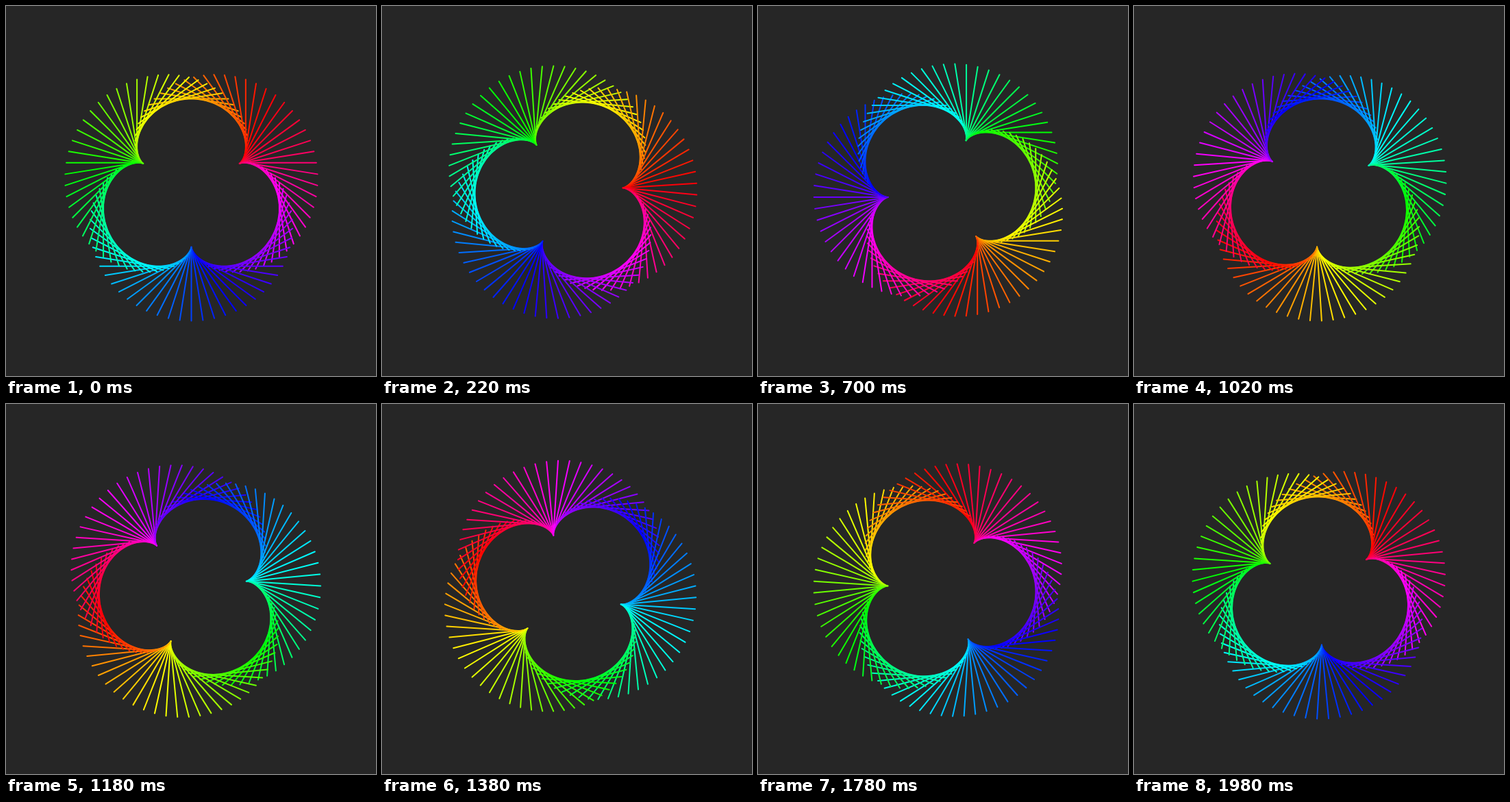
An HTML page with a canvas for the animation above (2000 ms loop, 540 by 540 pixels).

```html
<!DOCTYPE html>
<html lang="en">
<head>
<meta charset="utf-8">
<title>Spinning lines</title>
<style>
html, body { margin: 0; width: 100%; height: 100%; overflow: hidden; background: #262626; }
canvas { display: block; }
</style>
</head>
<body>
<canvas id="stage" width="540" height="540"></canvas>
<script>
const ctx = document.getElementById('stage').getContext('2d');
const COUNT = 100, RADIUS = 135, HALF = 54, CENTER = 270.5;
const LOOP = 2000, STEP = 20;
const TAU = Math.PI * 2;

// Bearings run clockwise from straight up.
function drawLine(turn, phase) {
  const place = turn * TAU;
  const x = CENTER + RADIUS * Math.sin(place);
  const y = CENTER - RADIUS * Math.cos(place);
  const bearing = 2.5 * place - TAU / 4 - phase * TAU;
  const dx = HALF * Math.sin(bearing);
  const dy = -HALF * Math.cos(bearing);
  const hue = (((45 + 360 * (phase - turn)) % 360) + 360) % 360;
  ctx.strokeStyle = `hsl(${hue}, 100%, 50%)`;
  ctx.beginPath();
  ctx.moveTo(x - dx, y - dy);
  ctx.lineTo(x + dx, y + dy);
  ctx.stroke();
}

function draw(ms) {
  const phase = Math.floor((ms % LOOP) / STEP) * STEP / LOOP;
  ctx.fillStyle = '#262626';
  ctx.fillRect(0, 0, 540, 540);
  ctx.lineWidth = 2;
  ctx.lineCap = 'round';
  for (let i = 0; i < COUNT; i++) drawLine(i / COUNT, phase);
}

const start = performance.now();
function tick() {
  draw(performance.now() - start);
  requestAnimationFrame(tick);
}
tick();
</script>
</body>
</html>
```
